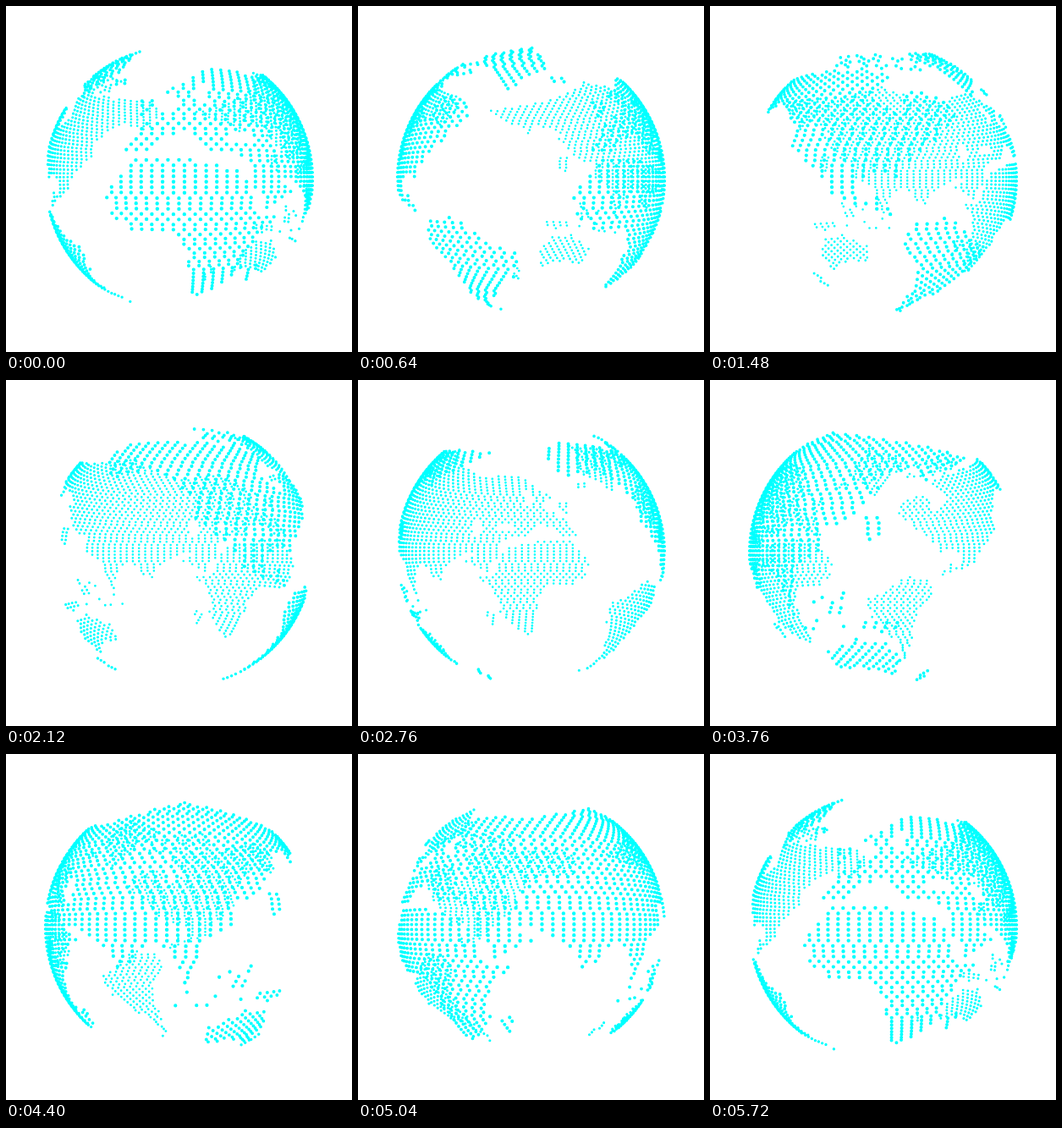
Write an HTML page with a canvas that moves like this. It is 409 px wide and 409 px high and loops after 5760 ms.

```html
<!DOCTYPE html>
<html lang="en">
<head>
<meta charset="utf-8">
<title>Dotted globe</title>
<style>
  html, body { margin: 0; width: 100%; height: 100%; overflow: hidden; background: #fff; }
  canvas { display: block; width: 409px; height: 409px; }
</style>
</head>
<body>
<canvas id="stage" width="409" height="409"></canvas>
<script>
const LOOP = 5760, STEP = 40;
const SIZE = 409, CENTER = SIZE / 2, LIMB = 158, DISTANCE = 3.8;
const FOCAL = LIMB * Math.sqrt(DISTANCE ** 2 - 1);
const ROWS = 100, DOT = 6.2;
const RAD = Math.PI / 180;

// Rough continents: a few corner points each, as lon, lat pairs
const africa = [-17,21, -16,13, -8,4.5, 9,5, 14,-12, 17,-33, 25,-34, 40,-16, 40,-3, 51,11, 43,11,
  33,30, 10,36, -6,35];
const eurasia = [-9,37, -9,43, -3,48, 10,55, 5,60, 25,71, 60,69, 104,77, 140,72, 190,66, 180,62, 162,57,
  157,51, 156,60, 137,54, 141,52, 128,37, 118,38, 122,30, 108,21, 107,11, 102,3, 98,16, 91,22, 78,8,
  70,21, 58,26, 48,30, 59,22, 45,13, 35,29, 36,36, 27,37, 22,38, 13,45, 3,43, -2,37];
const northAmerica = [-168,66, -157,71, -82,68, -94,59, -80,52, -78,62, -62,58, -56,52, -66,44, -81,31,
  -81,25, -90,30, -97,26, -95,18, -88,20, -83,10, -78,8, -105,20, -112,30, -124,40, -124,48, -140,59,
  -160,56];
const southAmerica = [-77,8, -62,11, -50,0, -35,-7, -40,-20, -53,-33, -65,-42, -68,-55, -75,-50, -71,-18,
  -81,-5];
const australia = [114,-22, 131,-12, 137,-16, 142,-11, 153,-26, 149,-38, 132,-32, 115,-34];
const greenland = [-70,78, -32,83, -20,72, -44,60, -54,69];
const continents = [africa, eurasia, northAmerica, southAmerica, australia, greenland];

const oval = (lon, lat, rx, ry) => ({ lon, lat, rx, ry });
const islands = {
  madagascar: oval(47, -19, 2.8, 6.5),
  newGuinea: oval(141, -5, 8, 3.5),
  newZealand: oval(172, -41, 3, 6),
  japan: oval(138, 37, 3.5, 5),
  britain: oval(-3, 54, 3, 4),
  iceland: oval(-19, 65, 4, 1.5),
};
const seas = {
  black: oval(34, 43, 6, 2.2),
  caspian: oval(51, 42, 3, 5),
  baltic: oval(20, 60, 2.5, 5),
};

// Archipelagos: boxes in which only a share of the dots is land
const scatters = [
  { west: 98, east: 128, south: -9, north: 14, share: 0.3 },
  { west: -122, east: -65, south: 69, north: 77, share: 0.55 },
];

let seed = 7;
const random = () => (seed = seed * 16807 % 2147483647) / 2147483647;

function inPolygon(shape, x, y) {
  let hit = false;
  for (let i = 0, j = shape.length - 2; i < shape.length; j = i, i += 2) {
    const [x1, y1, x2, y2] = [shape[i], shape[i + 1], shape[j], shape[j + 1]];
    if (y1 > y !== y2 > y && x < x1 + (x2 - x1) * (y - y1) / (y2 - y1)) hit = !hit;
  }
  return hit;
}

const inAnyOval = (ovals, lon, lat) => Object.values(ovals).some(
  o => Math.hypot((lon - o.lon) / o.rx, (lat - o.lat) / o.ry) < 1);

const inScatter = (lon, lat) => scatters.some(
  s => lon > s.west && lon < s.east && lat > s.south && lat < s.north && random() < s.share);

const isLand = (lon, lat) => !inAnyOval(seas, lon, lat) && (
  continents.some(shape => inPolygon(shape, lon, lat)) ||
  inAnyOval(islands, lon, lat) || inScatter(lon, lat));

// The flat map is a Miller sheet squeezed onto the sphere
const mapLon = angle => (angle + 11.5) / 0.946;
const mapLat = phi => Math.atan(Math.sinh((phi + 21.5) / 44.5 / 1.25)) / 0.8 / RAD;

// Equal arc spacing: each ring carries a count proportional to its circumference
function buildDots() {
  const dots = [];
  for (let row = 0; row < ROWS; row++) {
    const phi = -90 + (row + 0.5) * 180 / ROWS;
    const ring = Math.cos(phi * RAD), height = Math.sin(phi * RAD);
    const count = Math.round(ROWS * ring), lat = mapLat(phi);
    for (let i = 0; i < count; i++) {
      const angle = -180 + 360 * i / count;
      if (isLand(mapLon(angle), lat)) dots.push({ angle: angle * RAD, ring, height });
    }
  }
  return dots;
}

const dots = buildDots();
const ctx = document.getElementById("stage").getContext("2d");

function draw(time) {
  const tick = Math.floor(time % LOOP / STEP);
  const turn = (1.8 + 360 * tick * STEP / LOOP) * RAD;
  ctx.fillStyle = "#fff";
  ctx.fillRect(0, 0, SIZE, SIZE);
  ctx.fillStyle = "#0ff";
  ctx.beginPath();
  for (const { angle, ring, height } of dots) {
    const depth = DISTANCE - ring * Math.cos(angle + turn);
    const scale = FOCAL / depth, radius = DOT / depth;
    const x = CENTER + scale * ring * Math.sin(angle + turn);
    const y = CENTER - scale * height;
    ctx.moveTo(x + radius, y);
    ctx.arc(x, y, radius, 0, 2 * Math.PI);
  }
  ctx.fill();
}

const start = performance.now();
function frame() {
  draw(performance.now() - start);
  requestAnimationFrame(frame);
}
frame();
</script>
</body>
</html>
```
